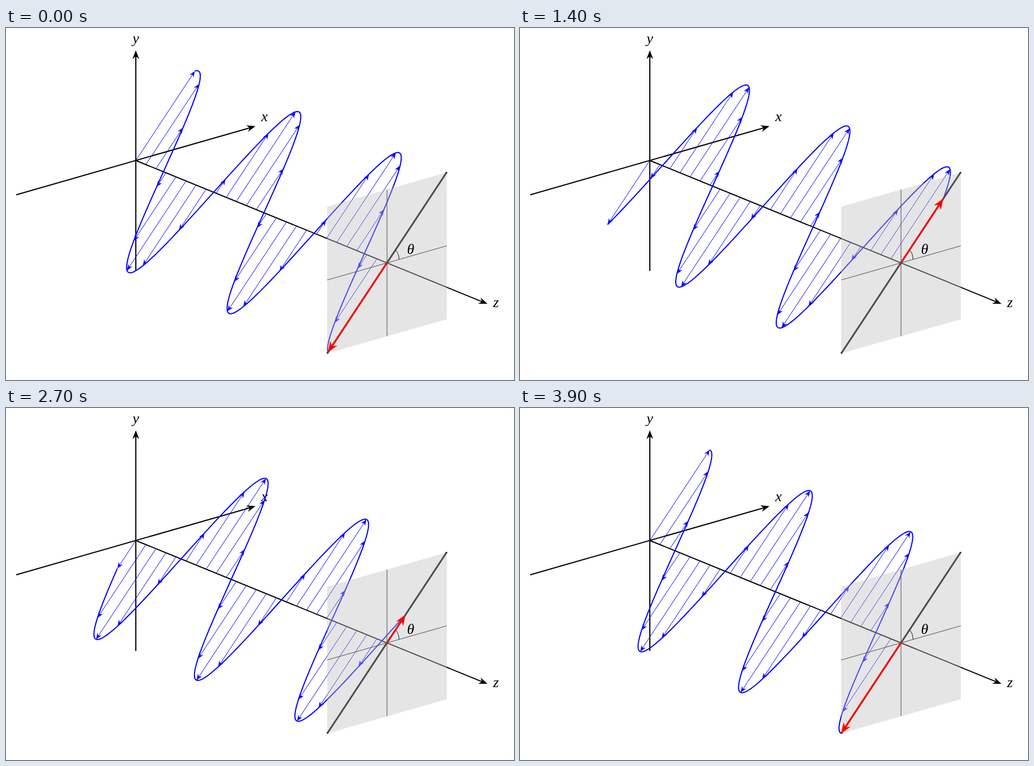
Write an HTML page that moves like this. It is 900x623 px and loops after 4000 ms.

```html
<!DOCTYPE html>
<html lang="en">
<head>
<meta charset="utf-8">
<title>Linearly polarised wave</title>
<style>
  html, body { margin: 0; width: 100%; height: 100%; overflow: hidden; background: #fff; }
  svg { display: block; width: 900px; height: 623px; }
  path { fill: none; stroke: #000; stroke-width: 1; }
  text { font: italic 26px "Liberation Serif", "Noto Serif", serif; text-anchor: middle; }
  .thick { stroke-width: 2; }
  .heavy { stroke-width: 3; }
  .blue { stroke: #00f; }
  .red { stroke: #f00; }
  .head { fill: #000; stroke: none; }
  .blue.head { fill: #00f; }
  .red.head { fill: #f00; }
  .plane { fill: rgba(191, 191, 191, .4); stroke: none; }
</style>
</head>
<body>
<svg viewBox="0 0 900 623">
  <path id="axes" class="thick"/>
  <path id="axisHeads" class="head"/>
  <text x="230" y="27">y</text>
  <text x="458" y="165">x</text>
  <text x="868" y="493.5">z</text>
  <path id="field" class="blue"/>
  <path id="fieldHeads" class="blue head"/>
  <path id="wave" class="blue thick"/>
  <path d="M569 446L781 385.5M675 286V545.5"/>
  <path class="heavy" d="M569 576.2L781 255"/>
  <path class="plane" d="M569 316.2L781 255.7V515.5L569 576Z"/>
  <path id="arc"/>
  <text x="717" y="399.5">θ</text>
  <path id="probe" class="red heavy"/>
  <path id="probeHead" class="red head"/>
</svg>
<script>
const ORIGIN = [230, 234.5];
const STEP = [17.8, 7.24];      // one sample along z
const AMP = [106, -160.4];      // full field vector
const SAMPLES = 25, PER_WAVE = 10;
const LOOP = 4000, TICK = 100;

const set = (id, d) => document.getElementById(id).setAttribute('d', d);
const pt = (x, y) => x.toFixed(2) + ' ' + y.toFixed(2);
const along = s => [ORIGIN[0] + STEP[0] * s, ORIGIN[1] + STEP[1] * s];

// Shaft and barbed head of an arrow from a to b
function arrow(a, b, len, width, inset) {
  const dx = b[0] - a[0], dy = b[1] - a[1], dist = Math.hypot(dx, dy);
  if (dist < 1) return { shaft: '', head: '' };
  const ux = dx / dist, uy = dy / dist;
  const at = (back, side) => pt(b[0] - ux * back - uy * side, b[1] - uy * back + ux * side);
  return {
    shaft: `M${pt(...a)}L${at(len - inset, 0)}`,
    head: `M${at(0, 0)}L${at(len, width / 2)}L${at(len - inset, 0)}L${at(len, -width / 2)}Z`
  };
}

function drawAxes() {
  const axes = [
    [[18, 295.2], [442, 173.8]],
    [[230, 430], [230, 39.5]],
    [ORIGIN, [853, 488.3]]
  ].map(([a, b]) => arrow(a, b, 15.5, 12, 5));
  set('axes', axes.map(a => a.shaft).join(''));
  set('axisHeads', axes.map(a => a.head).join(''));

  const [cx, cy] = along(SAMPLES), arc = [];
  for (let i = 0; i <= 15; i++) {
    const a = i / 15 * Math.PI / 4;
    arc.push(pt(cx + 21.2 * Math.cos(a), cy - 6.05 * Math.cos(a) - 26 * Math.sin(a)));
  }
  set('arc', 'M' + arc.join('L'));
}

function draw(ms) {
  const turn = (Math.floor(ms / TICK) + 1) * TICK / LOOP;
  const tip = s => {
    const e = Math.cos(2 * Math.PI * (turn - s / PER_WAVE)), [x, y] = along(s);
    return [x + AMP[0] * e, y + AMP[1] * e];
  };

  const curve = [];
  for (let i = 0; i <= SAMPLES * 12; i++) curve.push(pt(...tip(i / 12)));
  set('wave', 'M' + curve.join('L'));

  let shafts = '', heads = '';
  for (let s = 0; s < SAMPLES; s++) {
    const a = arrow(along(s), tip(s), 11, 8.5, 3.5);
    shafts += a.shaft;
    heads += a.head;
  }
  set('field', shafts);
  set('fieldHeads', heads);

  const probe = arrow(along(SAMPLES), tip(SAMPLES), 19, 15, 6);
  set('probe', probe.shaft);
  set('probeHead', probe.head);
}

function frame() {
  draw(performance.now() % LOOP);
  requestAnimationFrame(frame);
}

drawAxes();
frame();
</script>
</body>
</html>
```
